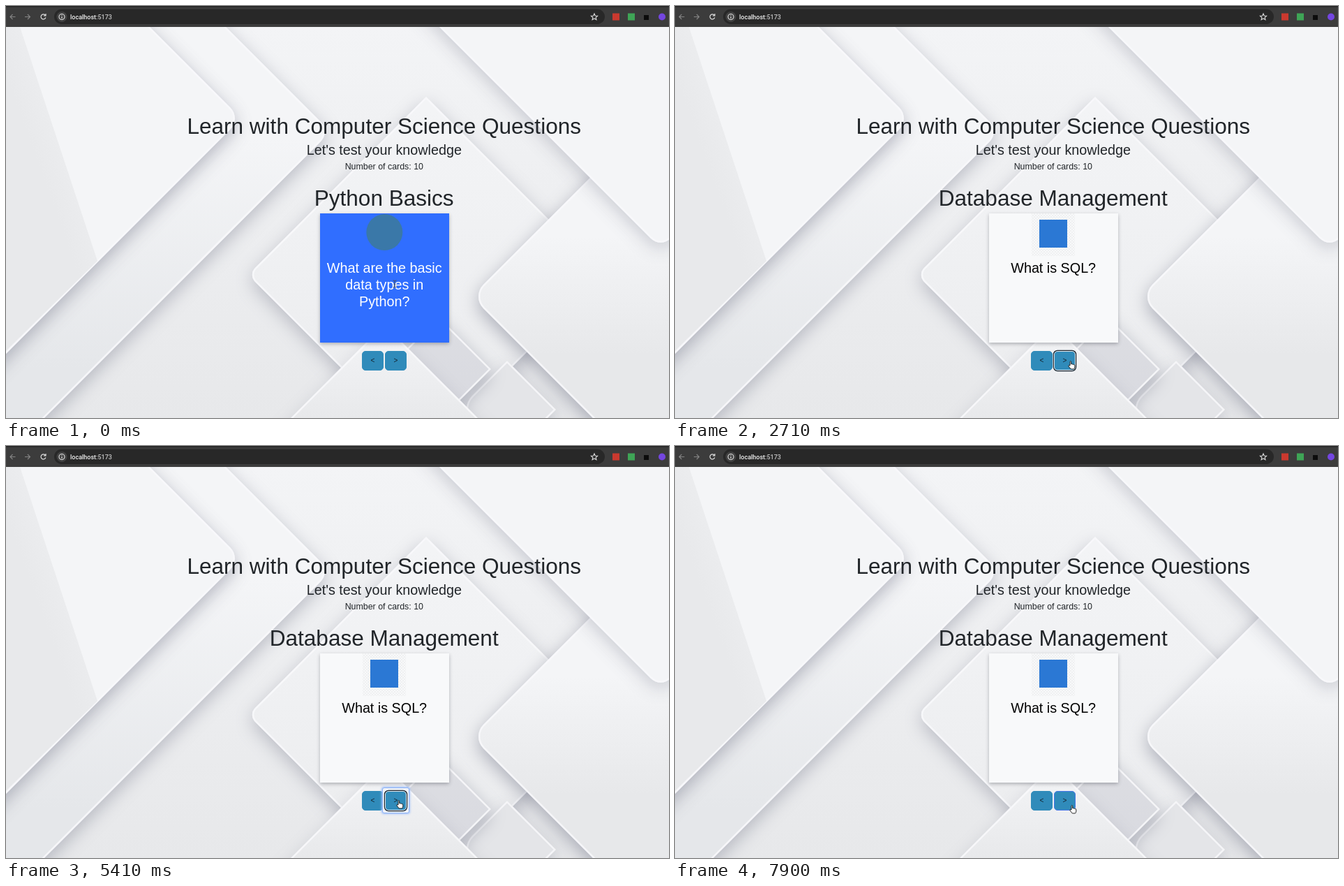
Animation of 950x590 px, one loop 8 s. Source, as an HTML page with a canvas:

```html
<!DOCTYPE html>
<html lang="en">
<head>
<meta charset="utf-8">
<title>Flashcards</title>
<style>
html, body { margin: 0; width: 950px; height: 590px; overflow: hidden; }
body { position: relative; font-family: Arial, "Liberation Sans", sans-serif; }
body > * { position: absolute; }
canvas, .layer { left: 0; top: 0; }
text { text-anchor: middle; }
.h1 { font-size: 31.55px; }
.h2 { font-size: 19.75px; }
.small { font-size: 9.85px; }
#card { left: 449.7px; top: 296.8px; width: 184.6px; height: 184.6px; box-shadow: 0 2px 5px rgba(40,42,55,.32); }
#card svg { position: absolute; left: 0; top: 0; }
.btn { top: 493.5px; width: 31px; height: 28px; box-sizing: border-box; border: 1px solid #308bba; border-radius: 5px;
  background: #308bba; color: #14202a; font-size: 10px; line-height: 26px; text-align: center; }
.btn.hover { border-color: #4a78e8; }
.btn.ring { border-color: #e8eef3; box-shadow: 0 0 0 1.2px #15212c; }
#prev { left: 510px; }
#next { left: 543px; }
#glow { top: 488.5px; width: 37px; height: 35px; border: 1.5px solid #8db3f8; border-radius: 3px;
  background: #f2f4f8; box-shadow: 0 0 3px 1px #9dbefa; }
#pointer { z-index: 2; }
</style>
</head>
<body>
<canvas id="bg" width="950" height="590"></canvas>
<svg class="layer" width="950" height="590" fill="#212529">
  <rect width="950" height="30" fill="#3c3c3c"/>
  <rect width="950" height="1.5" fill="#242424"/>
  <rect x="69" y="4.5" width="789" height="21.5" rx="10.7" fill="#282828"/>
  <g fill="none" stroke="#858585" stroke-width="1.1">
    <path d="M13.5 15.5H6M9.5 12L6 15.5 9.5 19M27 15.5h7.5M31 12l3.5 3.5L31 19"/>
    <path stroke="#dcdcdc" stroke-width="1.2" d="M56.5 13.5a3.5 3.5 0 1 0 .4 3M57 11v3h-3"/>
    <circle cx="80" cy="15.5" r="7.5" fill="#414141" stroke="none"/>
    <circle cx="80" cy="15.5" r="4" stroke="#e4e4e4"/>
    <path stroke="#e4e4e4" d="M80 15v3M80 13v1"/>
    <path stroke="#dcdcdc" d="M843 11l1.3 3 3.3.3-2.5 2.2.8 3.2-2.9-1.7-2.9 1.7.8-3.2-2.5-2.2 3.3-.3z"/>
  </g>
  <text x="92" y="18.5" style="text-anchor:start;font:500 9px Roboto,sans-serif" fill="#f0f0f0">localhost<tspan fill="#c4c4c4">:5173</tspan></text>
  <rect x="869" y="10.5" width="10" height="10" fill="#c9392f"/>
  <rect x="891" y="10.5" width="10" height="10" fill="#3fa556"/>
  <rect x="914" y="13" width="7" height="7" fill="#0c0c0c"/>
  <circle cx="940" cy="15.5" r="5" fill="#7446e0"/>
  <text class="h1" x="541.7" y="183">Learn with Computer Science Questions</text>
  <text class="h2" x="541.8" y="212.7">Let's test your knowledge</text>
  <text x="541.8" y="234.4" font-size="12.4">Number of cards: 10</text>
  <text class="h1" id="topic" x="541.7" y="285.5"></text>
</svg>
<div id="card"></div>
<div id="prev" class="btn">&lt;</div>
<div id="glow"></div>
<div id="next" class="btn">&gt;</div>
<svg id="pointer" class="layer" width="950" height="590"></svg>
<script>
const $ = id => document.getElementById(id);

// Wallpaper: stacked square panels turned by 45 degrees, each casting a soft shadow
const c = $('bg').getContext('2d');
const RIGHT = 0, DOWN = 1, LEFT = 2, UP = 3;

function vertical(top, bottom, y0 = 30, y1 = 590) {
  const g = c.createLinearGradient(0, y0, 0, y1);
  g.addColorStop(0, top);
  g.addColorStop(1, bottom);
  return g;
}
// (x, y) is the visible corner; "reach" is how far its two sides run along each axis
function panel(x, y, facing, radius, fill, shadow, reach = 900) {
  const dx = [1, 0, -1, 0][facing] * reach, dy = [0, 1, 0, -1][facing] * reach;
  c.beginPath();
  c.moveTo(x - dx + dy, y - dy - dx);
  c.arcTo(x, y, x - dx - dy, y - dy + dx, radius);
  c.lineTo(x - dx - dy, y - dy + dx);
  c.lineTo(x - 2 * dx, y - 2 * dy);
  c.closePath();
  c.save();
  c.shadowColor = `rgba(90,94,115,${shadow})`;
  c.shadowBlur = 26;
  c.shadowOffsetY = 8;
  c.fillStyle = fill;
  c.fill();
  c.restore();
  c.save();
  c.clip();
  c.strokeStyle = 'rgba(249,250,252,.85)';
  c.lineWidth = 5;
  c.stroke();
  c.restore();
}

c.fillStyle = vertical('#f3f4f6', '#e7e8ea');
c.fillRect(0, 0, 950, 590);
panel(347, 385, LEFT, 14, vertical('#f3f4f6', '#ebecee', 150, 590), .34, 255);
panel(648, 578, LEFT, 28, '#e4e5e8', .3, 70);
panel(695, 520, RIGHT, 0, vertical('#dcdde2', '#d9dae0', 460, 570), .4, 75);
panel(542, 456, UP, 8, vertical('#f2f3f5', '#e8e9eb', 480), .2);
panel(667, 416, LEFT, 24, vertical('#f4f5f7', '#e7e8ea', 330, 500), .45);
panel(938, 347, DOWN, 20, '#f4f5f7', .28);
panel(465, 180, RIGHT, 20, vertical('#f4f5f7', '#e5e7ea', 190, 520), .36);
panel(337, 161, RIGHT, 22, '#f4f5f7', .42);

const side = c.createLinearGradient(0, 100, 110, 60);
side.addColorStop(0, '#e8e9eb');
side.addColorStop(1, '#f1f2f4');
c.fillStyle = side;
c.fill(new Path2D('M0 30H20L131 365L0 494Z'));

// Cards
const lines = (cls, y, step, rows) =>
  rows.map((s, i) => `<text class="${cls}" x="92.2" y="${y + i * step}">${s}</text>`).join('');
const question = (...rows) => lines('h2', 85.4, 23.6, rows);
const answer = (id, ...rows) => lines('h1', 28.6, 0, ['Answer']) +
  `<text x="92.2" y="56.3" font-size="17">${id}</text>` + lines('small', 76.3, 14.8, rows);

const checks = `<defs><pattern id="chk" width="4" height="4" patternUnits="userSpaceOnUse">
  <path d="M0 0h2v2H0zM2 2h2v2H2z" fill="#eff0f1"/></pattern></defs><rect x="61" width="62" height="61" fill="url(#chk)"/>`;
const python = {
  topic: 'Python Basics', bg: '#306eff', ink: '#fff',
  front: '<circle cx="92.3" cy="27" r="26" fill="#3a78a8"/>' + question('What are the basic', 'data types in', 'Python?'),
  back: answer(1, 'The basic data types in Python include', 'integers, floats, strings, booleans, and', 'None.')
};
const database = {
  topic: 'Database Management', bg: '#f8f9fa', ink: '#000',
  front: checks + '<rect x="72" y="9" width="40" height="40" fill="#2b78d4"/>' + question('What is SQL?'),
  back: answer(6, 'SQL (Structured Query Language) is a', 'programming language used for',
    'managing and manipulating relational', 'databases.')
};
const languages = {
  topic: 'Programming Languages', bg: '#f8f9fa', ink: '#000',
  front: question('What is a variable?'), back: ''
};

// CSS "ease" curve, solved by bisection
function ease(x) {
  if (x <= 0 || x >= 1) return x <= 0 ? 0 : 1;
  let lo = 0, hi = 1, u;
  for (let i = 0; i < 20; i++) {
    u = (lo + hi) / 2;
    if (.75 * u * (1 - u) + u ** 3 < x) lo = u; else hi = u;
  }
  return .3 * u * (1 - u) ** 2 + 3 * u * u * (1 - u) + u ** 3;
}

const shapes = {
  arrow: '<path d="M0 0V10.5L2.5 8.3 4.2 12 6 11.2 4.4 7.6H7.6Z" fill="#000" stroke="#fff" stroke-width=".8"/>',
  beam: '<path d="M-2.5-5Q0-5 0-3.5Q0-5 2.5-5M0-3.5V3.5M-2.5 5Q0 5 0 3.5Q0 5 2.5 5M-1.2 1H1.2" fill="none" stroke="#4b4b4b" stroke-width=".9"/>',
  hand: `<path d="M3 7V1.2Q3.8-.2 4.7 1.2V4.8Q6 4 6.6 5.2Q7.8 4.6 8.3 5.7Q9.8 5.3 9.8 6.8V9Q9.6 11 8.5 12H4.3L.8 7.8Q.6 6.3 2 6.7Z"
    fill="#fff" stroke="#111" stroke-width=".9" stroke-linejoin="round"/>`
};

// The screen refreshes in steps; the pointer rests at each place from one step to another
const STEP = 208, LAST = 38;
const rests = [
  { from: 0, to: 3, x: 557, y: 398 },
  { from: 8, to: 13, x: 563, y: 508 },
  { from: 17, to: 20, x: 532, y: 510 },
  { from: 23, to: 26, x: 559, y: 507 },
  { from: 29, to: 34, x: 534, y: 402 },
  { from: 38, to: 38, x: 565, y: 514 }
];
function pointer(k) {
  const i = rests.findLastIndex(r => r.from <= k);
  const a = rests[i], b = rests[i + 1] || a;
  const u = k > a.to ? ((k - a.to) / (b.from - a.to)) ** 3 : 0;
  const x = a.x + (b.x - a.x) * u, y = a.y + (b.y - a.y) * u;
  const shape = y > 490 ? 'hand' : u ? 'arrow' : 'beam';
  return `<g transform="translate(${x} ${y})">${shapes[shape]}</g>`;
}

const flips = [180, 1150, 5700, 7080];

function draw(t) {
  const k = Math.min(LAST, Math.floor((t + 8) / STEP));
  const within = (a, b) => k >= a && k < b;

  const card = k < 10 || within(19, 23) ? python : within(23, 25) ? languages : database;
  $('topic').textContent = card.topic;

  const turn = flips.reduce((sum, s, i) => sum + (i % 2 ? -180 : 180) * ease((k * STEP - s) / 800), 0);
  const back = turn > 90;
  const caret = back && within(4, 6) ? '<path d="M105.8 96.5v12" stroke="#cfdcff" stroke-width=".8"/>' : '';
  $('card').style.background = card.bg;
  $('card').style.transform = `perspective(792px) rotateY(${back ? turn - 180 : turn}deg)`;
  $('card').innerHTML = `<svg width="184.6" height="184.6" fill="${card.ink}">${back ? card.back + caret : card.front}</svg>`;

  const nextGlow = within(9, 13) || within(23, 27);
  const prevGlow = within(19, 22);
  $('glow').hidden = !nextGlow && !prevGlow;
  $('glow').style.left = nextGlow ? '538.5px' : '505.5px';
  $('prev').style.zIndex = prevGlow ? 1 : 0;
  $('prev').className = 'btn' + (prevGlow ? ' ring' : within(17, 22) ? ' hover' : '');
  $('next').className = 'btn' + (nextGlow || within(13, 19) ? ' ring' : k === LAST ? ' hover' : '');

  $('pointer').innerHTML = pointer(k);
}

const start = performance.now();
function tick() {
  draw((performance.now() - start) % 8000);
  requestAnimationFrame(tick);
}
tick();
</script>
</body>
</html>
```
